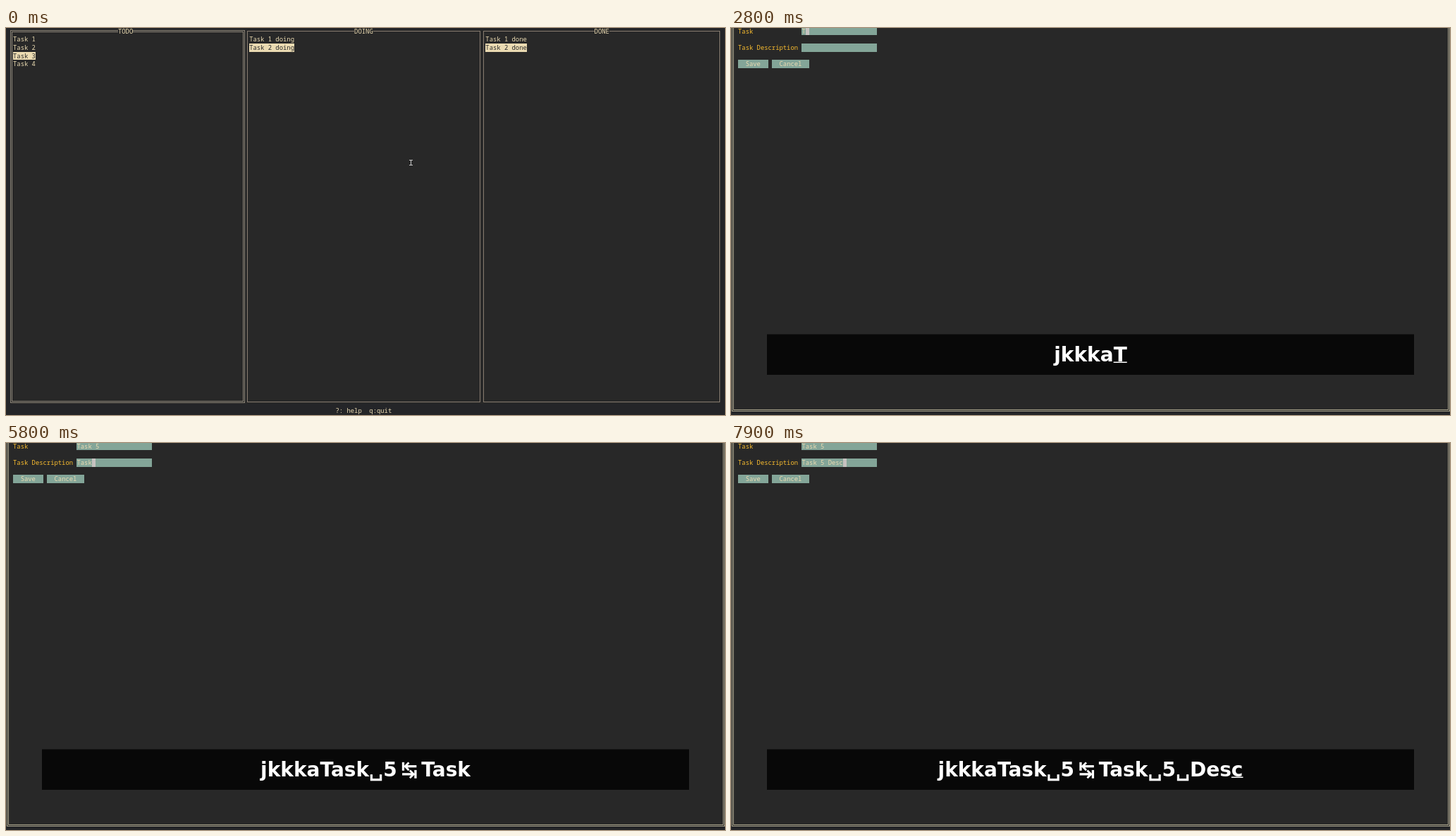
Recreate the animation shown at these times as an HTML page with a canvas. Size 1020 px wide and 549 px high, loop 8000 ms.

```html
<!DOCTYPE html>
<html lang="en">
<head>
<meta charset="utf-8">
<title>Kanban in the terminal</title>
<style>
  html, body { margin: 0; width: 100%; height: 100%; overflow: hidden; background: #282828; }
  canvas { display: block; }
</style>
</head>
<body>
<canvas id="stage" width="1020" height="549"></canvas>
<script>
const ctx = document.getElementById('stage').getContext('2d');
const LOOP = 8000;
const CELL_W = 5.32, CELL_H = 11.7;
const BG = '#282828', MARGIN = '#242528';
const CREAM = '#ebdbb2', YELLOW = '#fabd2f', TEAL = '#83a598';
const TERMINAL_FONT = '8.87px "Noto Sans Mono", monospace';
const KEY_FONT = 'bold 28px "DejaVu Sans", sans-serif';
const FORM_OPENS = 1700;

// Each key: character, press time, delay until the app reacts, time underlined.
const keys = [
  ['j', 500, 0, 200], ['k', 800, 0, 200], ['k', 900, 0, 200], ['k', 1000, 0, 200],
  ['a', 1700, 0, 200],
  ['T', 2800, 0, 200], ['a', 2900, 0, 200], ['s', 3000, 0, 200], ['k', 3100, 200, 200],
  [' ', 3300, 100, 300], ['5', 4000, 200, 300], ['\t', 4500, 100, 300],
  ['T', 5100, 0, 200], ['a', 5300, 0, 200], ['s', 5400, 0, 200], ['k', 5600, 100, 200],
  [' ', 6100, 100, 200], ['5', 6600, 100, 200], [' ', 6700, 100, 300],
  ['D', 7200, 200, 300], ['e', 7500, 0, 200], ['s', 7600, 0, 200], ['c', 7700, 200, 300]
].map(([char, time, lag, linger]) => ({ char, time, applied: time + lag, linger }));

const colX = col => 10 + col * CELL_W;
const rowY = row => -1.4 + row * CELL_H;

// Pixel centre of the middle of a cell, so that thin lines stay sharp.
const midX = col => Math.floor(colX(col + 0.5)) + 0.5;
const midY = row => Math.floor(rowY(row + 0.5)) + 0.5;

function fillCells(col, row, count, color) {
  const x = Math.round(colX(col)), y = Math.round(rowY(row));
  ctx.fillStyle = color;
  ctx.fillRect(x, y, Math.round(colX(col + count)) - x, Math.round(rowY(row + 1)) - y);
}

function print(text, col, row, color = CREAM, background) {
  if (background) fillCells(col, row, text.length, background);
  ctx.font = TERMINAL_FONT;
  ctx.fillStyle = color;
  ctx.fillText(text, colX(col), Math.round(rowY(row) + 9));
}

function frame(left, top, right, bottom, color, double) {
  ctx.strokeStyle = color;
  ctx.lineWidth = 1;
  for (const d of double ? [-1, 1] : [0]) {
    ctx.strokeRect(midX(left) + d, midY(top) + d,
      midX(right) - midX(left) - 2 * d, midY(bottom) - midY(top) - 2 * d);
  }
}

function panel(left, right, titleCol, title, items, selected, active) {
  frame(left, 0, right, 45, active ? '#8c8578' : '#877c70', active);
  fillCells(titleCol, 0, title.length, BG);
  print(title, titleCol, 0);
  items.forEach((item, i) => i === selected
    ? print(item, left + 1, i + 1, BG, CREAM)
    : print(item, left + 1, i + 1));
}

function drawBoard(t) {
  let selected = 2;
  for (const key of keys) {
    if (key.applied <= t) selected += { j: 1, k: -1 }[key.char] || 0;
  }
  ctx.fillStyle = BG;
  ctx.fillRect(6, 3, 1007, 530);
  panel(-1, 61, 28, 'TODO', ['Task 1', 'Task 2', 'Task 3', 'Task 4'], selected, true);
  panel(62, 124, 91, 'DOING', ['Task 1 doing', 'Task 2 doing'], 1);
  panel(125, 188, 155, 'DONE', ['Task 1 done', 'Task 2 done'], 1);
  print('?: help  q:quit', 86, 46);
}

function drawPointer() {
  ctx.fillStyle = '#c8c8c8';
  ctx.fillRect(574, 187, 1, 8);
  ctx.fillRect(572, 187, 5, 1);
  ctx.fillRect(572, 194, 5, 1);
}

function drawForm(t) {
  ctx.fillStyle = BG;
  ctx.fillRect(0, 0, 1020, 544);
  frame(-2, -2, 189, 46, '#a9a38c', true);

  const typed = keys
    .filter(key => key.time > FORM_OPENS && key.applied <= t)
    .map(key => key.char).join('').split('\t');
  ['Task', 'Task Description'].forEach((label, i) => {
    const row = i * 2, value = typed[i] || '';
    print(label, 0, row, YELLOW);
    fillCells(17, row, 20, TEAL);
    print(value, 17, row);
    if (i === typed.length - 1) fillCells(17 + value.length, row, 1, '#c6c2c0');
  });
  print('  Save  ', 0, 4, CREAM, TEAL);
  print('  Cancel  ', 9, 4, CREAM, TEAL);
}

function drawKeys(t) {
  const pressed = keys.filter(key => key.time <= t);
  if (!pressed.length) return;
  ctx.fillStyle = 'rgba(0, 0, 0, 0.8)';
  ctx.fillRect(51, 434.5, 918, 57.5);

  const symbols = { ' ': '\u2423', '\t': '\u2009\u21b9\u2009' };
  const text = pressed.map(key => symbols[key.char] || key.char).join('').trimEnd();
  ctx.font = KEY_FONT;
  ctx.fillStyle = '#fff';
  const width = ctx.measureText(text).width;
  ctx.fillText(text, 510 - width / 2, 472.6);

  const last = pressed[pressed.length - 1];
  if (t < last.time + last.linger) {
    const lastWidth = ctx.measureText(text.slice(-1)).width;
    ctx.fillRect(510 + width / 2 - lastWidth, 473.5, lastWidth, 1.5);
  }
}

function draw(t) {
  ctx.fillStyle = MARGIN;
  ctx.fillRect(0, 0, 1020, 549);
  if (t < FORM_OPENS) drawBoard(t);
  else drawForm(t);
  if (t < keys[0].time) drawPointer();
  drawKeys(t);
}

const start = performance.now();
function tick() {
  draw((performance.now() - start) % LOOP);
  requestAnimationFrame(tick);
}
tick();
</script>
</body>
</html>
```
